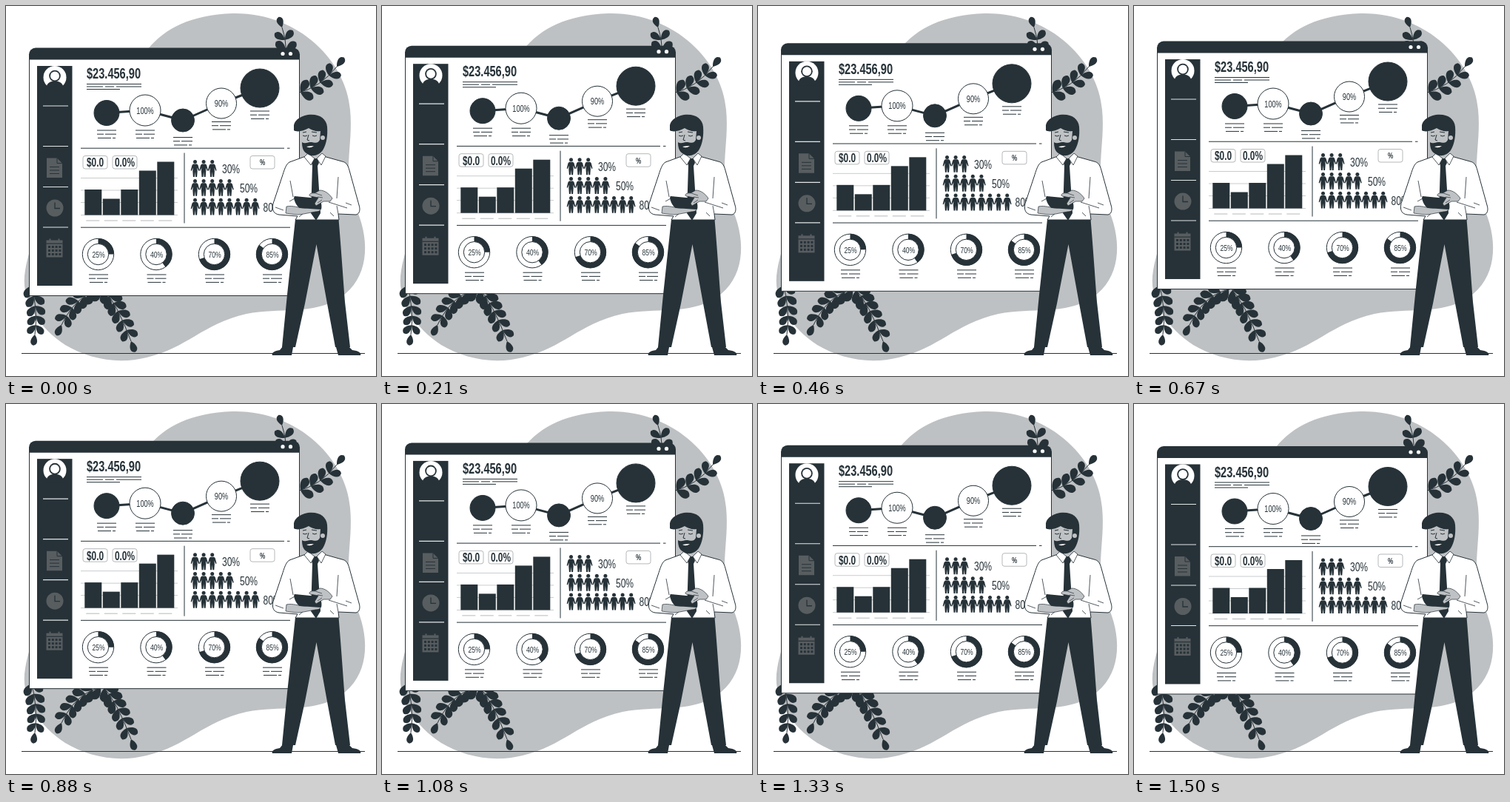
These frames come from a looping animation (500x500 px, 1.54 s). An HTML page with a canvas:

```html
<!DOCTYPE html>
<html lang="en">
<head>
<meta charset="utf-8">
<title>Floating dashboard</title>
<style>
  html, body { margin: 0; width: 100%; height: 100%; overflow: hidden; background: #fff; }
  canvas { display: block; width: 500px; height: 500px; }
</style>
</head>
<body>
<canvas id="stage"></canvas>
<script>
const canvas = document.getElementById('stage');
const ctx = canvas.getContext('2d');
const ratio = window.devicePixelRatio || 1;
canvas.width = canvas.height = 500 * ratio;

const DARK = '#263238', GRAY = '#bec1c3', ICON = '#585d60', WHITE = '#fff', SKIN = '#bfc2c4';
const LOOP = 1540, STEP = LOOP / 37, NARROW = 0.73;
const FLOAT = [[0, 0.5], [690, 9.8], [1420, 0.1], [1500, 0], [1540, 0.5]];

function lift(time) {
  const i = FLOAT.findIndex(([t]) => t > time);
  const [t0, y0] = FLOAT[i - 1], [t1, y1] = FLOAT[i];
  return y0 + (y1 - y0) * (time - t0) / (t1 - t0);
}

function shape(d, fill, stroke, width = 1) {
  const path = new Path2D(d);
  if (fill) { ctx.fillStyle = fill; ctx.fill(path); }
  if (stroke) { ctx.strokeStyle = stroke; ctx.lineWidth = width; ctx.stroke(path); }
}

function rect(x, y, w, h, fill) {
  ctx.fillStyle = fill;
  ctx.fillRect(x, y, w, h);
}

function round(x, y, w, h, radius, fill, stroke) {
  ctx.beginPath();
  ctx.roundRect(x, y, w, h, radius);
  if (fill) { ctx.fillStyle = fill; ctx.fill(); }
  if (stroke) { ctx.strokeStyle = stroke; ctx.lineWidth = 1; ctx.stroke(); }
}

function disc(x, y, r, fill, stroke, width = 1) {
  ctx.beginPath();
  ctx.arc(x, y, r, 0, Math.PI * 2);
  if (fill) { ctx.fillStyle = fill; ctx.fill(); }
  if (stroke) { ctx.strokeStyle = stroke; ctx.lineWidth = width; ctx.stroke(); }
}

function line(x0, y0, x1, y1, color = DARK, width = 1) {
  ctx.beginPath();
  ctx.moveTo(x0, y0);
  ctx.lineTo(x1, y1);
  ctx.strokeStyle = color;
  ctx.lineWidth = width;
  ctx.stroke();
}

// Condensed lettering, centred on (x, y)
function label(text, x, y, size, weight = 400) {
  ctx.save();
  ctx.translate(x, y + size * 0.36);
  ctx.scale(NARROW, 1);
  ctx.font = `${weight} ${size}px "Liberation Sans", Arial, sans-serif`;
  ctx.textAlign = 'center';
  ctx.fillStyle = DARK;
  ctx.fillText(text, 0, 0);
  ctx.restore();
}

function caption(x, y) {
  line(x - 13, y, x + 13, y);
  line(x - 13, y + 5.2, x - 4, y + 5.2);
  line(x - 2, y + 5.2, x + 13, y + 5.2);
  line(x - 12, y + 10.4, x + 6, y + 10.4);
  line(x + 8, y + 10.4, x + 12, y + 10.4);
}

function leaf(x, y, angle, len) {
  ctx.save();
  ctx.translate(x, y);
  ctx.rotate(angle);
  ctx.beginPath();
  ctx.moveTo(0, 0);
  ctx.bezierCurveTo(len * 0.35, -len * 0.3, len * 0.85, -len * 0.48, len, 0);
  ctx.bezierCurveTo(len * 0.85, len * 0.48, len * 0.35, len * 0.3, 0, 0);
  ctx.fillStyle = DARK;
  ctx.fill();
  ctx.restore();
}

function branch([ax, ay], [bx, by], [cx, cy], pairs, len, spread = 0.75) {
  shape(`M${ax} ${ay}Q${bx} ${by} ${cx} ${cy}`, null, DARK);
  for (let i = 0; i <= pairs; i++) {
    const t = 0.08 + 0.92 * i / pairs, u = 1 - t;
    const x = u * u * ax + 2 * u * t * bx + t * t * cx;
    const y = u * u * ay + 2 * u * t * by + t * t * cy;
    const angle = Math.atan2(u * (by - ay) + t * (cy - by), u * (bx - ax) + t * (cx - bx));
    const size = len * (1.08 - 0.2 * t);
    if (i === pairs) leaf(x, y, angle, size);
    else [-spread, spread].forEach(side => leaf(x, y, angle + side, size));
  }
}

function backdrop() {
  rect(0, 0, 500, 500, WHITE);
  shape('M25 365C22 400 45 435 80 458C110 476 150 485 190 475C245 462 265 430 325 416C370 407 415 418 452 394C490 368 492 320 475 278C452 228 470 190 465 140C460 75 395 8 306 10C250 12 215 30 192 58C160 100 60 250 31 335C28 345 26 355 25 365Z', GRAY);
  line(21, 469.5, 485, 469.5);
  branch([33, 372], [44, 410], [39, 444], 5, 17);
  branch([134, 382], [96, 387], [75, 431], 6, 18);
  branch([130, 380], [150, 402], [169, 453], 6, 18);
  branch([393, 118], [425, 110], [447, 82], 4, 18);
  branch([378, 63], [379, 48], [373, 29], 2, 17, 0.85);
}

function sidebar() {
  rect(42, 81.5, 47.5, 297, DARK);
  disc(66, 97, 15.5, WHITE);
  shape('M54 114C54 106 58 102 66 102S78 106 78 114Z', DARK);
  disc(66, 95, 7.8, DARK);
  disc(66, 95, 6, WHITE);
  [135.5, 190, 245, 299.5].forEach(y => line(50, y, 84, y, '#e4e6e7', 1.2));

  shape('M55 206H69L76 213V232.500H55Z', ICON);
  shape('M69 206V213H76M59 218H72M59 222.500H72M59 227H72', null, DARK);

  disc(66, 273.5, 11.5, ICON);
  shape('M66 266V274H73', null, DARK, 1.3);

  rect(54.500, 317, 22, 23, ICON);
  rect(54.500, 321, 22, 1.2, DARK);
  for (let i = 0; i < 12; i++) rect(57 + i % 4 * 4.800, 324.500 + Math.floor(i / 4) * 5, 3, 3, DARK);
  rect(58.500, 315, 2, 4, ICON);
  rect(70.500, 315, 2, 4, ICON);
}

function trend() {
  label('$23.456,90', 145.5, 91.5, 20, 700);
  line(109, 106, 183, 106);
  line(109, 109.5, 131, 109.5);
  line(134, 109.5, 146, 109.5);
  line(149, 109.5, 183, 109.5);
  line(109, 113, 154, 113);

  const nodes = [[136, 145, 17, '', 168.5], [188, 141.500, 21, '100%', 168.5],
    [239, 155, 15.5, '', 178], [291, 132, 20.5, '90%', 157], [343, 111.5, 26, '', 142.5]];
  nodes.slice(1).forEach(([x, y], i) => line(nodes[i][0], nodes[i][1], x, y, DARK, 3));
  nodes.forEach(([x, y, r, text, below]) => {
    disc(x, y, r, text ? WHITE : DARK, DARK);
    if (text) label(text, x, y, 12.5);
    caption(x, below);
  });
}

function bars() {
  [233, 249.5, 266, 283].forEach(y => line(101, y, 232, y, '#c9cccd'));
  [248.5, 261, 248.5, 223, 211].forEach((top, i) => {
    const x = 106.3 + i * 24.5;
    rect(x, top, 23, 283 - top, DARK);
    line(x + 2, 290.5, x + 20, 290.5, '#b5b8ba');
  });
  [[104, '$0.0'], [144, '0.0%']].forEach(([x, text]) => {
    round(x, 203, 33, 17.5, 3, WHITE, '#b5b8ba');
    label(text, x + 16.5, 212, 16.3, 700);
  });
}

function person(x, y) {
  ctx.save();
  ctx.translate(x, y);
  disc(0, 2.6, 2.5, DARK);
  shape('M-2.500 5.500H2.500L4 7L5.800 14L4.800 15L2.800 10.500L3.200 15L2.600 23H.6L0 16L-.6 23H-2.600L-3.200 15L-2.800 10.500L-4.800 15L-5.800 14L-4 7Z', DARK);
  ctx.restore();
}

function crowd() {
  [[3, '30%', 304], [5, '50%', 328], [8, '80%', 359.5]].forEach(([count, text, x], row) => {
    const y = 208.5 + row * 25.8;
    for (let i = 0; i < count; i++) person(255.5 + i * 11.6, y);
    label(text, x, y + 12, 16.5);
  });
  round(330, 203, 33, 17.5, 3, WHITE, '#b5b8ba');
  label('%', 346.500, 212, 11, 700);
}

function donut(x, percent) {
  const y = 336, start = -Math.PI / 2, end = start + Math.PI * 2 * percent / 100;
  disc(x, y, 21.2, WHITE, DARK);
  ctx.beginPath();
  ctx.moveTo(x, y);
  ctx.arc(x, y, 21.5, start, end);
  ctx.fillStyle = DARK;
  ctx.fill();
  disc(x, y, 14.2, WHITE, DARK);
  label(percent + '%', x + 0.5, y, 11.8);
  caption(x + 0.5, 363.5);
}

function board() {
  rect(31.5, 66, 365, 326, WHITE);
  ctx.strokeStyle = DARK;
  ctx.lineWidth = 1;
  ctx.strokeRect(31.5, 66, 365, 326);
  round(31, 57, 366, 16, [9, 9, 0, 0], DARK);
  disc(374, 65, 2.6, WHITE);
  disc(384.500, 65, 2.6, WHITE);
  sidebar();
  trend();
  line(101, 192.7, 376, 192.7);
  line(380, 192.7, 383.5, 192.7);
  line(241, 199, 241, 294);
  line(101, 299.7, 384, 299.7);
  bars();
  crowd();
  [[124.5, 25], [203, 40], [281.5, 70], [359.500, 85]].forEach(([x, p]) => donut(x, p));
}

function man() {
  // Trousers and shoes
  shape('M391 288H449.500C453 330 455 360 458 400L465 461H445L434 402L419.500 322L404 402L391 461H373L380 390Z', DARK);
  shape('M374 460L388 461L386 472H360C358 469 363 466 370 465Z', DARK);
  shape('M446 461L463 460L468 465C476 466 481 469 479 472H449Z', DARK);

  // Shirt
  shape('M405 203L383 211C378 214 376 222 373 231L361 267C359 276 362 281 369 282L394 284L391 289H450L449 281L473 282C478 281 479 275 477 269L464 222C462 214 459 211 454 210L429 203Z', WHITE, DARK);
  shape('M384 236L388 258M383 264L394 258M449 231L447 260M449 281L447 270M436 265L461 273M459 266L467 269M364 272L375 276M396 285L402 280M443 284L438 279', null, DARK, 0.8);

  // Neck, collar and tie
  shape('M408 192H427L426 204L417 208L409 204Z', SKIN);
  shape('M415 206H421L423 212L421 216L425 280L419 290L412 280L414 216L413 212Z', DARK);
  shape('M408 199L417 206L412 215L403 204ZM427 199L420 206L426 215L432 203Z', WHITE, DARK, 0.8);

  // Head
  shape('M399 164C397 175 398 185 401 192C408 204 424 202 430 188L432 163Z', SKIN);
  shape('M389 164C388 156 396 149 408 147C423 145 433 152 434 163C435 175 433 187 428 195C423 202 413 205 406 199C401 196 400 190 400 184C405 187 407 184 411 184C417 184 421 187 424 181L425 169C419 170 414 168 409 165C402 169 393 171 389 168Z', DARK);
  disc(428, 178, 3, SKIN);
  shape('M406 190Q411 193 416 189Q411 189 406 190Z', WHITE);
  shape('M401 171L406 170M413 170L420 171M401 175Q404 177 407 175M414 175Q417 177 420 175M409 174L407 181L410 182', null, DARK, 1);

  // Hands and tablet
  shape('M379 271C388 269 395 273 404 273L424 270C428 274 425 278 418 278L402 281C394 283 386 281 378 280Z', SKIN, DARK, 0.7);
  shape('M390 257L422 260C426 261 428 274 425 275L397 273C393 272 387 259 390 257Z', DARK);
  shape('M438 264L429 264L419 270L417 267L422 259L411 257C408 255 412 252 417 253L424 249C431 249 437 254 441 260Z', SKIN, DARK, 0.7);
  shape('M418 253L427 256M421 258L428 259M421 266L427 262', null, DARK, 0.7);
}

function draw(now) {
  const tick = Math.floor((now % LOOP + 5) / STEP) % 37;
  ctx.setTransform(ratio, 0, 0, ratio, 0, 0);
  backdrop();
  ctx.save();
  ctx.translate(0, -lift(tick * STEP));
  board();
  ctx.restore();
  man();
}

let origin;
function frame(now) {
  origin ??= now;
  draw(Math.max(0, now - origin));
  requestAnimationFrame(frame);
}
draw(0);
requestAnimationFrame(frame);
</script>
</body>
</html>
```
